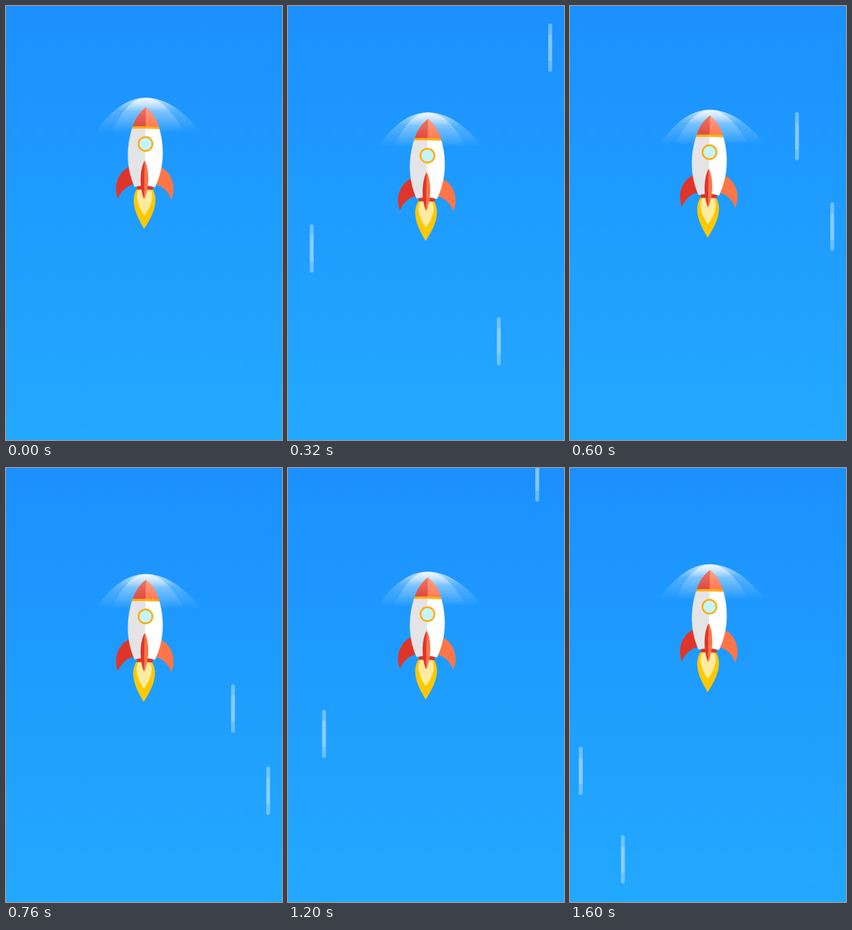
Animation, 596 px wide and 939 px high, one loop 1.64 s. Source, as an HTML page:

```html
<!DOCTYPE html>
<html lang="en">
<head>
<meta charset="utf-8">
<title>Rocket</title>
<style>
  html, body { margin: 0; width: 100%; height: 100%; overflow: hidden; background: #1f9dff; }
  svg { display: block; width: 100%; height: 100%; }
</style>
</head>
<body>
<svg viewBox="0 0 596 939" preserveAspectRatio="none">
  <defs>
    <linearGradient id="sky" x2="0" y2="1">
      <stop stop-color="#1b90fe"/>
      <stop offset=".5" stop-color="#1f9dff"/>
      <stop offset="1" stop-color="#23a8ff"/>
    </linearGradient>
    <linearGradient id="glow" x2="0" y2="1">
      <stop stop-color="#fff" stop-opacity=".75"/>
      <stop offset=".38" stop-color="#fff" stop-opacity=".24"/>
      <stop offset="1" stop-color="#fff" stop-opacity="0"/>
    </linearGradient>
    <linearGradient id="noseL" x2="0" y2="1">
      <stop stop-color="#ed7768"/>
      <stop offset="1" stop-color="#df4a3e"/>
    </linearGradient>
    <linearGradient id="noseR" x2="0" y2="1">
      <stop stop-color="#ffa088"/>
      <stop offset="1" stop-color="#ff7a50"/>
    </linearGradient>
    <g id="streak" fill="#fff">
      <rect width="8.4" height="104.5" rx="4.2" opacity=".35"/>
      <rect y="23.5" width="8.4" height="57.5" rx="3" opacity=".18"/>
    </g>
  </defs>

  <rect width="596" height="939" fill="url(#sky)"/>
  <g id="streaks"></g>
  <g id="ship">
    <g id="dome" fill="url(#glow)">
      <path d="M192 275C224 228 261 198.500 302 198.500C344 198.500 384 227 418 270Z"/>
      <path d="M228 275C244 234 272 198.500 302 198.500C333 198.500 363 231 383 270Z"/>
    </g>
    <!-- the window is the centre, y runs down the slightly tilted axis -->
    <g transform="translate(301.2 298.5) rotate(.9)">
      <g id="flame"></g>
      <g id="hull"></g>
      <path fill="#ffaf0f" d="M-28.400 -37.500Q0 -39 28.400 -37.500L29.600 -32.500Q0 -34 -29.600 -32.500Z"/>
      <circle r="15" fill="#c4f5ff" stroke="#ffaf0f" stroke-width="4"/>
      <g id="keel" transform="translate(-1.1)"></g>
    </g>
  </g>
</svg>
<script>
const LOOP = 1640, HEIGHT = 939, STREAK = 104.5;
const RED = '#df3529', ORANGE = '#ff7547';
const start = document.timeline.currentTime || 0;
const byId = id => document.getElementById(id);

function add(parent, tag, attrs) {
  const el = document.createElementNS('http://www.w3.org/2000/svg', tag);
  for (const name in attrs) el.setAttribute(name, attrs[name]);
  return parent.appendChild(el);
}

// draws a right half and its mirror image
function pair(id, d, left, right = left) {
  add(byId(id), 'path', { d, fill: left, transform: 'scale(-1 1)' });
  add(byId(id), 'path', { d, fill: right });
}

// steps: [ms, y] pairs, linear in between, shown at 25 pictures a second
function slide(el, ...steps) {
  const keys = steps.map(([ms, y]) => ({ offset: ms / LOOP, transform: `translateY(${y}px)` }));
  const anim = el.animate(keys, {
    duration: LOOP, iterations: Infinity, easing: 'steps(41, end)', delay: -1
  });
  anim.startTime = start;
}

// a part that trails behind the ship at take-off, then keeps its distance
const trail = (id, gap) => slide(byId(id), [0, 0], [400, gap], [LOOP, gap]);

// a streak crosses the whole stage at a steady speed
function streak(x, enter, exit) {
  const speed = (HEIGHT + STREAK) / (exit - enter);
  const at = ms => [ms, (ms - enter) * speed - STREAK];
  const g = add(byId('streaks'), 'g', {});
  add(g, 'use', { href: '#streak', x });
  slide(g, at(0), at(LOOP));
}

pair('flame', 'M-1 97.5H17C21.5 105 23.5 114 23.5 123C23 144 11.5 165 0 183.5Z', '#ffc800');
pair('flame', 'M-1 97.5H12C15 102.5 16.5 108 16.5 113.500C16 128 8.5 143 0 155Z', '#ffeba0');
pair('hull', 'M35.3 50.8C55.5 60 70 90.5 57.5 119.500C52.5 105 41 92 25 88Z', RED, ORANGE);
pair('hull', 'M-1 90H17.5L16.8 99H-1Z', '#d9362a');
pair('hull', 'M-.5 -35H29C42 6.5 41 53 22 93.500Q11 90 -.5 90Z', '#e4e4e6', '#fff');
pair('hull', 'M-.3 -79.500H0Q20 -64.500 28.400 -36.800H-.3Z', 'url(#noseL)', 'url(#noseR)');
pair('keel', 'M0 35.500C11 55 11 95.500 0 120Z', RED, ORANGE);
byId('flame').style.translate = '-1.1px';

slide(byId('ship'), [0, 0], [400, 31.6], [600, 17.8], [940, 28.2], [LOOP, 0]);
trail('dome', 8.2);
trail('flame', 1.2);

streak(451, 42, 415);
streak(47, 58, 532);
streak(562, 217, 972);
streak(486, 376, 1076);
streak(73.6, 779, 1479);
streak(534, 1172, 1573);
streak(19, 1219, 1781);
streak(110, 1283, 1651);
</script>
</body>
</html>
```
